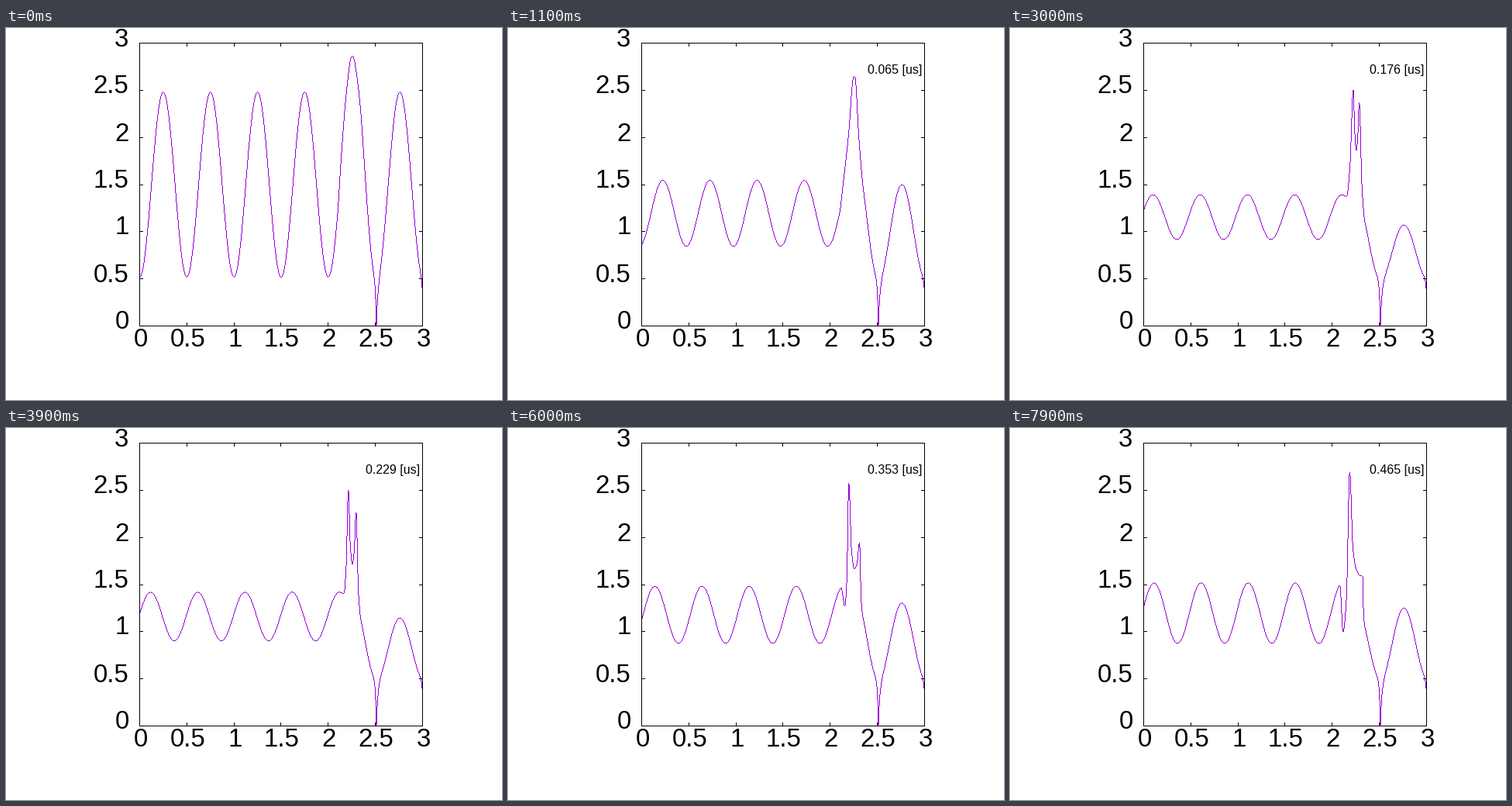
Write a matplotlib script that moves like this. It is 640x480 px and loops after 8000 ms.

```python
import numpy as np
import matplotlib.pyplot as plt
from matplotlib.animation import FuncAnimation

W, H, DPI = 640, 480, 100
PX = 72 / DPI                       # one pixel in points
FRAMES, INTERVAL = 80, 100
L, R, T, B = 172.5, 537.5, 19.5, 384.5
UNIT = (R - L) / 3
NODE, CORE = 2.51, 2.255            # sharp zero, centre of the spike
KEYS = (0, 11, 18, 30, 54, 79)      # times of the slow swings


def smooth(xs, ys, x):
    """Monotone cubic through the points (xs, ys)."""
    xs, ys = np.asarray(xs, float), np.asarray(ys, float)
    h = np.diff(xs)
    s = np.diff(ys) / h
    a, b = s[:-1], s[1:]
    same = a * b > 0
    mid = np.where(same, 2 * a * b / np.where(same, a + b, 1), 0)
    m = np.concatenate([s[:1], mid, s[-1:]])
    i = np.clip(np.searchsorted(xs, x, side="right") - 1, 0, len(xs) - 2)
    t = (x - xs[i]) / h[i]
    return (ys[i] * (1 + 2 * t) * (1 - t) ** 2 + ys[i + 1] * t * t * (3 - 2 * t)
            + h[i] * t * (1 - t) * (m[i] * (1 - t) - m[i + 1] * t))


def standing(x, n):
    """Wave left of the spike; its reflection fades, then returns shifted."""
    mean = 1.125 + .375 * np.exp(-n / 6) + .0009 * n
    c = smooth(KEYS, (-.98, -.33, -.012, .074, -.07, .064), n)
    s = .33 * (1 - np.exp(-n / 26))
    k = 4 * np.pi * x
    return mean + c * np.cos(k) + s * np.sin(k)


def lobes(x, n):
    """Squared sine on both sides of the node, dropping sharply to zero."""
    after = smooth(KEYS, (1.98, 1, .63, .57, .81, .75), n)
    before = after + .4 * (1 - n / 79)
    u = (x - NODE + .25) % .5 - .25
    drop = 1 - np.exp(-abs(u) / np.where(u < 0, .009, .017))
    amp = np.where(x < NODE, before, after)
    return amp * np.sin(2 * np.pi * u) ** 2 + .5 * drop


def spike(n, end):
    """Landmarks of a peak that splits in two; the right half decays."""
    split = .006 + .0083 * np.sqrt(max(n - 20, 0))
    phases = (0, 18, 48, 79)
    peak = np.interp(n, phases, (2.86, 2.51, 2.5, 2.69))
    second = np.interp(n, phases, (2.86, 2.51, 2.165, 1.585))
    valley = min(peak, 1.66 + .85 * np.exp(-(n - 20) / 7))
    start = np.interp(n, phases, (2.1, 2.1, 2.145, 2.08))
    dip = np.interp(n, phases, (1.75, 1.33, 1.44, 1.0))
    marks = [(start + .035, dip), (CORE - split, peak), (CORE, valley),
             (CORE + .95 * split, second), end]

    # flanks are full at first and turn hollow
    bulge = .2 + .45 * np.exp(-n / 18)
    points = marks[:1]
    for (xa, ya), (xb, yb) in zip(marks, marks[1:]):
        low, high = sorted((ya, yb))
        points += [((xa + xb) / 2, low + bulge * (high - low)), (xb, yb)]
    return start, points[:-1]


GRID = np.linspace(0, 3, 601)
RIGHT = GRID[GRID > 2.343]


def curve(n, x):
    right = lobes(RIGHT, n)
    start, points = spike(n, (RIGHT[0], right[0]))
    left = GRID[GRID <= start]
    px, py = np.transpose(points)
    return smooth(np.concatenate([left, px, RIGHT]),
                  np.concatenate([standing(left, n), py, right]), x)


COLS = np.arange(int(L), int(R) + 1)
SUB = COLS[:, None] + np.linspace(0, 1, 9)
SUB_X = np.clip((SUB - L) / UNIT, 0, 3)


def pixel_runs(n):
    """One vertical run per pixel column, for a crisp line one pixel wide."""
    y = B - UNIT * curve(n, SUB_X)
    top, bottom = np.round(y.min(axis=1)), np.round(y.max(axis=1))
    top = np.where(top == bottom, np.floor(y[:, 4]), top)
    bottom = np.maximum(bottom, top + 1)
    gap = np.full(len(COLS), np.nan)
    xs = np.column_stack([COLS + .5, COLS + .5, gap])
    ys = np.column_stack([top + .3, bottom - .3, gap])
    return xs.ravel(), ys.ravel()


plt.rcParams["path.simplify"] = False
fig = plt.figure(figsize=(W / DPI, H / DPI), dpi=DPI, facecolor="white")
ax = fig.add_axes([0, 0, 1, 1])
ax.set_xlim(0, W)
ax.set_ylim(H, 0)
ax.axis("off")


def stroke(xs, ys, color, z):
    # half a pixel wide, so that it fills exactly one pixel when aliased
    return ax.plot(xs, ys, color=color, lw=PX / 2, antialiased=False, snap=False,
                   solid_capstyle="butt", solid_joinstyle="miter", zorder=z)[0]


def rule(xs, ys):
    stroke(xs, ys, "black", 3)


def label(x, y, text, size, align):
    return ax.text(x, y, text, fontsize=size * PX, family="Liberation Sans",
                   ha=align, va="baseline", color="black")


rule([L, R, R, L, L], [T, T, B, B, T])
for v in np.arange(0, 3.1, .5):
    step = round(v * UNIT)
    tx, ty = L + step, B - step
    for edge, way in ((B, -1), (T, 1)):
        rule([tx, tx], [edge, edge + 4.4 * way])
    for edge, way in ((L, 1), (R, -1)):
        rule([edge, edge + 4.4 * way], [ty, ty])
    label(tx + 1, 411, f"{v:g}", 33, "center")
    label(158.5, ty + 4, f"{v:g}", 33, "right")

line = stroke([], [], "#9400d3", 2)
clock = label(534.5, 59, "", 16, "right")


def draw(n):
    line.set_data(*pixel_runs(n))
    clock.set_text(f"{n / 170:.3f} [us]" if n else "")
    return line, clock


anim = FuncAnimation(fig, draw, frames=FRAMES, interval=INTERVAL,
                     repeat=True, repeat_delay=0)
plt.show()
```
